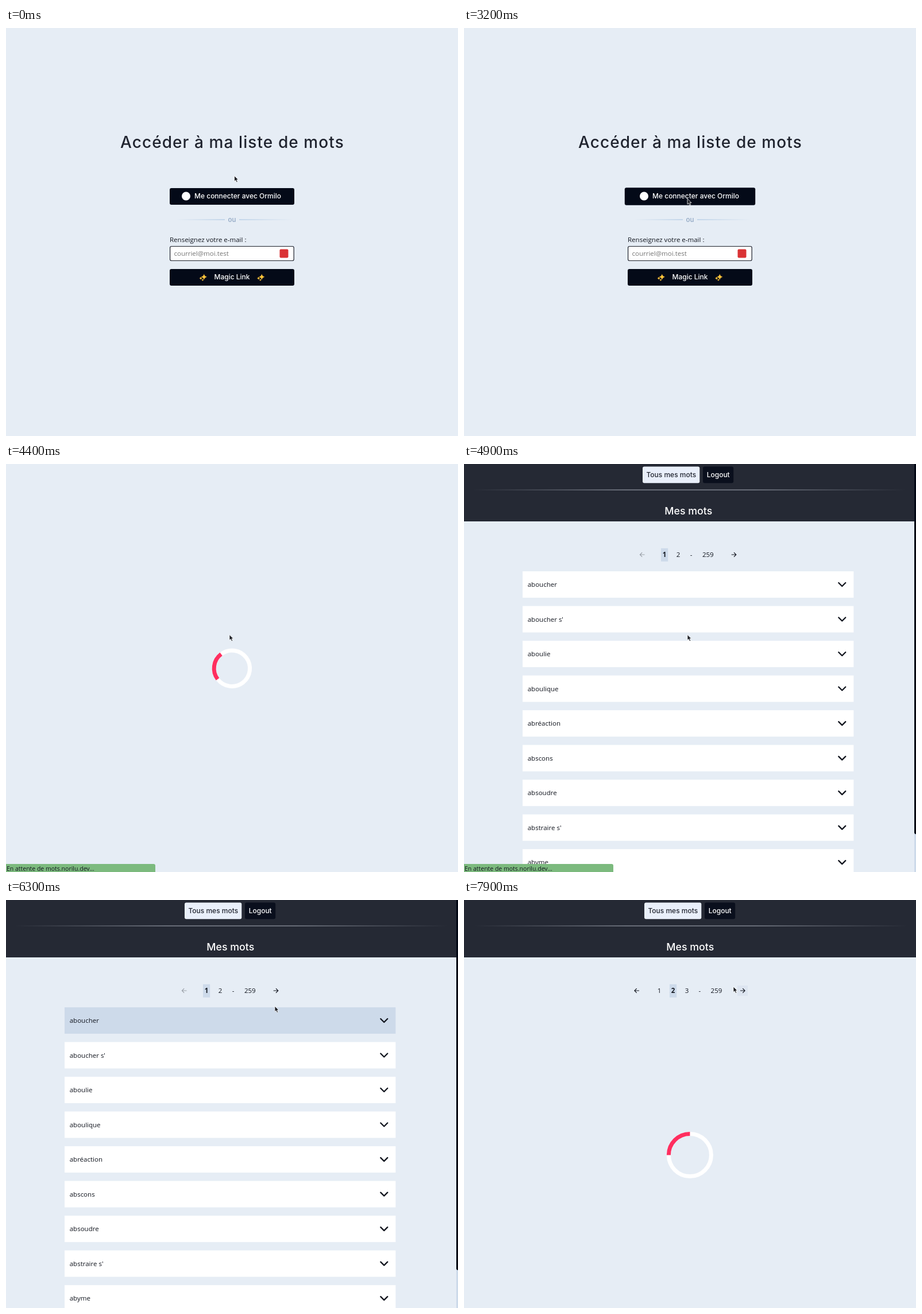
An HTML page that plays this animation: 787 by 711 pixels, repeating every 8 s.

```html
<!DOCTYPE html>
<html lang="fr">
<head>
<meta charset="utf-8">
<title>Liste de mots</title>
<style>
  html, body { margin: 0; width: 100%; height: 100%; overflow: hidden; background: #e6edf5; }
  svg { display: block; width: 787px; height: 711px; }
  text { font: 11.52px "Open Sans", "Noto Sans", sans-serif; fill: #12161f; }
  .ui { font: 500 12px Inter, sans-serif; }
  .light { fill: #fff; }
  .mid { text-anchor: middle; }
  .bold { font-weight: 700; }
  .line { fill: none; stroke: #12161f; }
</style>
</head>
<body>
<svg viewBox="0 0 787 711">
  <defs>
    <linearGradient id="fadeIn"><stop stop-color="#c3d6ea" stop-opacity="0"/><stop offset="1" stop-color="#c3d6ea"/></linearGradient>
    <linearGradient id="fadeOut"><stop stop-color="#c3d6ea"/><stop offset="1" stop-color="#c3d6ea" stop-opacity="0"/></linearGradient>
    <linearGradient id="rule">
      <stop stop-color="#d5dbe6" stop-opacity="0"/><stop offset=".35" stop-color="#d5dbe6" stop-opacity=".75"/>
      <stop offset=".65" stop-color="#d5dbe6" stop-opacity=".75"/><stop offset="1" stop-color="#d5dbe6" stop-opacity="0"/>
    </linearGradient>
    <path id="star" d="M0-1Q.18-.18 1 0Q.18.18 0 1Q-.18.18-1 0Q-.18-.18 0-1Z" fill="#fcc43a"/>
    <g id="sparkle">
      <use href="#star" transform="translate(1.8 -.8) scale(5.2)"/>
      <use href="#star" transform="translate(-3.8 1.6) scale(2.7)"/>
      <use href="#star" transform="translate(-.6 4.4) scale(2)"/>
    </g>
    <path id="chevron" class="line" d="M-6-3L0 3L6-3" stroke-width="2.3" stroke-linecap="round" stroke-linejoin="round"/>
    <path id="arrow" class="line" d="M-4 0H4M.3-3.8L4.1 0L.3 3.8" stroke-width="1.2"/>
  </defs>
  <rect width="787" height="711" fill="#e6edf5"/>

  <g id="login">
    <text class="mid" x="393.9" y="208.6" style="font:500 28px Inter,sans-serif;letter-spacing:1.08px;fill:#20242f">Accéder à ma liste de mots</text>
    <rect id="signIn" rx="3" fill="#040a18"/>
    <circle cx="313.5" cy="293" r="7.5" fill="#fff"/>
    <text class="ui light" x="328" y="297">Me connecter avec Ormilo</text>
    <rect x="296" y="333" width="85" height="2" fill="url(#fadeIn)"/>
    <rect x="406" y="333" width="94" height="2" fill="url(#fadeOut)"/>
    <text class="ui mid" x="393.5" y="338" style="font-size:11.5px;fill:#8fa6c3">ou</text>
    <text x="285" y="372.5">Renseignez votre e-mail :</text>
    <rect x="285.6" y="380.5" width="215.6" height="25" rx="2.5" fill="#fff" stroke="#1c202b" stroke-width="1.2"/>
    <text x="292.5" y="397" style="fill:#757575">courriel@moi.test</text>
    <rect x="476.5" y="385.5" width="15" height="15" rx="2" fill="#da3335"/>
    <rect x="285" y="420" width="217" height="29" rx="3" fill="#040a18"/>
    <text class="ui light mid" x="393.5" y="438">Magic Link</text>
    <use href="#sparkle" x="343" y="434.5"/>
    <use href="#sparkle" x="443.5" y="434.5"/>
  </g>

  <g id="words">
    <rect id="band" height="100" fill="#252934"/>
    <g id="head">
      <rect x="311" y="4.6" width="99.3" height="28.6" rx="3" fill="#e9effa"/>
      <text class="ui mid" x="360.8" y="22.6" style="fill:#20242f">Tous mes mots</text>
      <rect x="416" y="4.6" width="53.2" height="28.6" rx="3" fill="#0a0f1d"/>
      <text class="ui light mid" x="442.7" y="22.6">Logout</text>
      <rect x="14" y="44.6" width="756" height="1" fill="url(#rule)"/>
      <text class="ui light mid" x="390.8" y="87.6" style="font-size:17.8px">Mes mots</text>
    </g>
    <g id="pageOne"></g>
    <g id="pageTwo"></g>
    <g id="list"></g>
    <g id="scroll">
      <rect x="784" width="3" height="711" fill="#cddaea"/>
      <path d="M784 0H787V645Q784 645 784 642Z" fill="#020714"/>
    </g>
  </g>

  <g id="spinner" fill="none">
    <circle r="1" stroke="#fff" vector-effect="non-scaling-stroke" stroke-width="7"/>
    <path d="M-.7071.7071A1 1 0 0 1-.7071-.7071" stroke="#ff2e5f" vector-effect="non-scaling-stroke" stroke-width="7"/>
  </g>

  <g id="status">
    <path d="M0 697H257Q260 697 260 700V711H0Z" fill="#7cba7e"/>
    <text x="1" y="709" style="font-size:10.5px">En attente de mots.norilu.dev…</text>
  </g>

  <g id="cursor" stroke-linejoin="round" stroke="#fff" stroke-width=".8">
    <path id="pointer" fill="#1c1e24" d="M0 0V9.6L2.2 7.7L3.9 11.3L5.7 10.5L4.1 7H7Z"/>
    <path id="hand" fill="#1c1e24" d="M-1.7 .6Q-.7-.4 .3 .7L2 3.8L4.4 3.7Q6.2 4 6.2 6V8.4L5.2 11H-.2L-3 7.6Q-3.2 6.3-1.8 6.4L-.2 6.6Z"/>
  </g>
</svg>
<script>
const LOOP = 8000, STEP = 100;
const SPIN_AT = 3300, LIST_AT = 4900, NEXT_AT = 7800;
const WORDS = ["aboucher", "aboucher s'", "aboulie", "aboulique", "abréaction", "abscons", "absoudre", "abstraire s'", "abyme"];

// time, x, y
const PATH = [
  [0, 397.6, 257.6], [100, 397, 262], [200, 395, 272], [300, 392, 284], [400, 390, 293], [500, 389, 297.5],
  [5400, 389, 297.5], [5500, 408, 285], [5600, 436, 262.5], [5700, 445, 240], [5800, 451, 226],
  [6000, 457, 214], [6200, 464, 201], [6300, 468, 185], [6400, 469, 174], [6500, 470, 162], [6600, 470, 154],
  [6700, 470, 154], [6800, 474, 153], [6900, 479, 152.5], [7000, 474, 151], [7100, 469, 151], [8000, 469, 151]
];
const HAND = [[400, 800], [5500, 5700], [5800, 6300], [6500, 7300]];
const HOVER = { 0: [5800, 6300], 1: [5500, 5700] };

const $ = id => document.getElementById(id);
const clamp = v => Math.max(0, Math.min(1, v));
const within = (t, [a, b]) => t >= a && t < b;
const show = (id, on) => { $(id).style.display = on ? "" : "none"; };
const set = (el, attrs) => { for (const k in attrs) el.setAttribute(k, attrs[k]); };
const mix = (a, b, k) => `rgb(${a.map((v, i) => Math.round(v + (b[i] - v) * k))})`;

function pager(id, prev, dim, items, next, active) {
  const marks = items.map(([s, x]) => s === active
    ? `<rect x="${x - 6}" y="146.8" width="12.2" height="23" fill="#cddaea"/><text class="mid bold" x="${x}" y="162">${s}</text>`
    : `<text class="mid" x="${x}" y="162">${s}</text>`).join("");
  $(id).innerHTML = `${marks}
    <use href="#arrow" transform="translate(${prev} 158) scale(-1 1)" opacity="${dim}"/>
    <use href="#arrow" x="${next}" y="158"/>`;
}
pager("pageOne", 310.5, .35, [["1", 349], ["2", 373], ["-", 395.6], ["259", 424.8]], 469.7, "1");
pager("pageTwo", 301, 1, [["1", 340], ["2", 364], ["3", 388], ["-", 410.3], ["259", 439.5]], 485, "2");
$("pageTwo").insertAdjacentHTML("afterbegin", '<rect x="476" y="149" width="18" height="18" fill="#dde5f0"/>');

$("list").innerHTML = WORDS.map((w, i) => {
  const y = 187 + 60.52 * i;
  return `<g><rect x="102" y="${y}" width="576.4" height="46" fill="#fff"/>
    <text x="110.7" y="${y + 27}">${w}</text><use href="#chevron" x="658.3" y="${y + 23}"/></g>`;
}).join("");
const rows = [...$("list").children];

function place(t) {
  const i = Math.max(1, PATH.findIndex(p => p[0] >= t));
  const [a, b] = [PATH[i - 1], PATH[i]];
  const k = (t - a[0]) / (b[0] - a[0]);
  return [a[1] + (b[1] - a[1]) * k, a[2] + (b[2] - a[2]) * k];
}

// One turn per second
function spin(ms, y, r) {
  $("spinner").setAttribute("transform", `translate(393.4 ${y}) rotate(${ms * .36}) scale(${r})`);
}

function draw(t) {
  const loading = within(t, [SPIN_AT, LIST_AT]), next = t >= NEXT_AT;
  const listed = t >= LIST_AT && !next;
  show("login", t < SPIN_AT);
  show("words", t >= LIST_AT);
  show("list", listed);
  show("scroll", listed);
  show("pageOne", listed);
  show("pageTwo", next);
  show("spinner", loading || next);
  $("band").setAttribute("width", next ? 787 : 784);
  $("head").setAttribute("transform", `translate(${next ? 3 : 0})`);

  const grow = clamp((t - 200) / 300);
  set($("signIn"), {
    x: 285 - 5.2 * grow, y: 279 - .8 * grow,
    width: 217 + 10.4 * grow, height: 29 + 1.6 * grow
  });

  if (next) spin(t - 7775, 444.5, 37);
  else spin(t - 3378, 356.2, 31.2);

  for (const i in HOVER) {
    const [a, b] = HOVER[i], level = clamp((t - a) / 200) * clamp(1 - (t - b) / 200);
    rows[i].children[0].setAttribute("fill", mix([255, 255, 255], [205, 218, 234], level));
    rows[i].children[1].classList.toggle("bold", within(t, HOVER[i]));
  }

  show("status", t >= SPIN_AT);
  $("status").setAttribute("opacity", clamp((5200 - t) / 300));

  const hand = HAND.some(s => within(t, s));
  show("hand", hand);
  show("pointer", !hand);
  $("cursor").setAttribute("transform", `translate(${place(t)})`);
}

const begin = performance.now();
function tick() {
  const t = (performance.now() - begin) % LOOP;
  draw(Math.floor(t / STEP) * STEP);
  requestAnimationFrame(tick);
}
tick();
</script>
</body>
</html>
```
